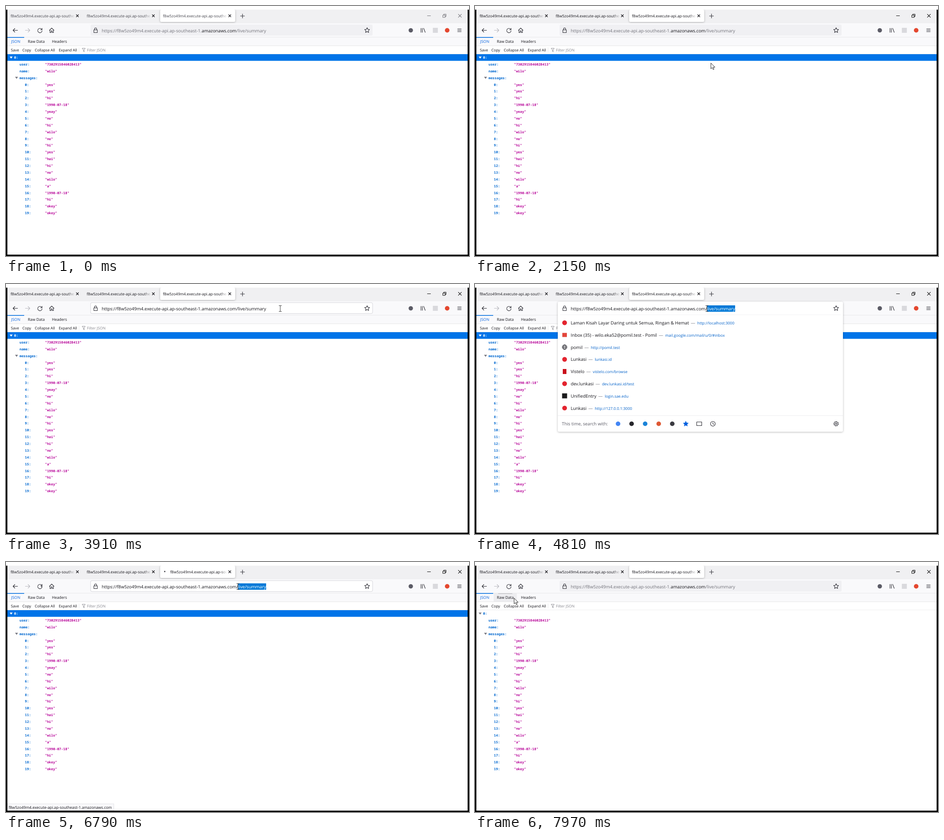
An HTML page for the animation above (8 s loop, 1018 px wide and 550 px high).

```html
<!DOCTYPE html>
<html lang="en">
<head>
<meta charset="utf-8">
<title>JSON viewer</title>
<style>
  html, body { margin: 0; width: 100%; height: 100%; overflow: hidden; background: #000; }
  svg { display: block; width: 100%; height: 100%; }
  text { font-family: "Open Sans", "Noto Sans", sans-serif; font-size: 8.43px; fill: #15141a;
         white-space: pre; text-rendering: geometricPrecision; }
  .big { font-size: 9.76px; }
  .tool { font-size: 8.25px; }
  .mono text { font-family: "Noto Sans Mono", "DejaVu Sans Mono", monospace; font-size: 7.43px; font-weight: 600; }
  .mono .key { fill: #0068d0; }
  .mono .val { fill: #b8089a; }
  .ico { fill: none; stroke: #2c2c34; stroke-width: 1.1; stroke-linecap: round; stroke-linejoin: round; }
  #panel, #active { filter: drop-shadow(0 1px 2px #0004); }
</style>
</head>
<body>
<svg id="stage" viewBox="0 0 1018 550" xmlns="http://www.w3.org/2000/svg"></svg>
<script>
const LOOP = 8000;
const host = 'f8w5zo49m4.execute-api.ap-southeast-1.';
const domain = 'amazonaws.com';
const path = '/live/summary';
const messages = ['yes', 'yes', 'hi', '1990-07-18', 'yeay', 'no', 'hi', 'wilo', 'no', 'hi', 'yes',
  'hai', 'hi', 'no', 'wilo', 'a', '1990-07-18', 'hi', 'okey', 'okey'];
const suggestions = [
  ['red', 'Laman Kisah Layar Daring untuk Semua, Ringan &amp; Hemat', 'http://localhost:3000'],
  ['mail', 'Inbox (35) - wilo.eka52@pomil.test - Pomil', 'mail.google.com/mail/u/0/#inbox'],
  ['globe', 'pomil', 'http://pomil.test'],
  ['red', 'Lunkasi', 'lunkasi.id'],
  ['film', 'Vistelo', 'vistelo.com/browse'],
  ['red', 'dev.lunkasi', 'dev.lunkasi.id/test'],
  ['dark', 'UnifiedEntry', 'login.sae.edu'],
  ['red', 'Lunkasi', 'http://127.0.0.1:3000']
];

const text = (x, y, s, attrs = '') => `<text x="${x}" y="${y}" ${attrs}>${s}</text>`;
const rect = (x, y, w, h, fill, attrs = '') =>
  `<rect x="${x}" y="${y}" width="${w}" height="${h}" fill="${fill}" ${attrs}/>`;
const dot = (x, y, r, fill) => `<circle cx="${x}" cy="${y}" r="${r}" fill="${fill}"/>`;
const icon = (x, y, d, attrs = '') => `<path class="ico" transform="translate(${x} ${y})" d="${d}" ${attrs}/>`;
const cross = r => `M${-r} ${-r}L${r} ${r}M${r} ${-r}L${-r} ${r}`;
const circle = r => `M${-r} 0A${r} ${r} 0 1 1 ${r} 0A${r} ${r} 0 1 1 ${-r} 0`;

function starPath(r) {
  const pts = Array.from({ length: 10 }, (_, i) => {
    const a = i * Math.PI / 5, q = i % 2 ? r * 0.48 : r;
    return `${(q * Math.sin(a)).toFixed(2)} ${(-q * Math.cos(a)).toFixed(2)}`;
  });
  return `M${pts.join('L')}Z`;
}

const tabTitle = (x, id) =>
  `<g transform="translate(${x} 25)" mask="url(#fade)">${text(0, 0, host + domain, `id="${id}"`)}</g>`;

function tabBar() {
  return rect(3, 8, 1012, 31, '#f0f0f2')
    + rect(339, 8, 165, 27, '#fff', 'id="active" rx="3"')
    + rect(339, 8, 134, 27, '#e4f2fd', 'id="burst" rx="3"')
    + tabTitle(10, 'title1') + tabTitle(177.5, 'title2') + tabTitle(345, 'title3')
    + '<circle id="throbber" cy="21" r="1.4" fill="#33333b"/>'
    + [157, 324, 492].map(x => icon(x, 21.5, cross(2.5), 'style="stroke:#15141a"')).join('')
    + icon(520, 22, 'M-4.5 0H4.5M0 -4.5V4.5')
    + `<g id="winButtons">${icon(930, 21.5, 'M-3.5 0H3.5', 'style="stroke:inherit"')
      + icon(964, 21.5, 'M-3.5 -1.5H1.5V3.5H-3.5ZM-1.5 -1.5V-3.5H3.5V1.5H1.5', 'style="stroke:inherit"')
      + icon(998, 21.5, cross(3.4), 'style="stroke:inherit"')}</g>`;
}

function navBar() {
  return rect(3, 38, 1012, 31, '#f9f9fb')
    + icon(20.5, 53.5, 'M5 0H-5M-1 -4L-5 0L-1 4')
    + icon(47.5, 53.5, 'M-5 0H5M1 -4L5 0L1 4', 'style="stroke:#b9b9bf"')
    + `<g id="reload">${icon(74.5, 54, 'M4.3 -2.2A4.8 4.8 0 1 0 4.8 .6M4.8 -5V-1.8H1.5')}</g>`
    + '<circle id="reloadDot" cx="78.5" cy="54" r="1.2" fill="#3d3d46"/>'
    + icon(100.5, 53.5, 'M-5 0L0 -5L5 0M-3.8 -1V5H-1.2V1.4H1.2V5H3.8V-1')
    + dot(890, 53.5, 4.8, '#5b5b66')
    + icon(917, 53.5, 'M-4.5 -4.5V4.5M-1.5 -4.5V4.5M1.2 -4.5L4.8 4.5')
    + rect(938.5, 48, 11, 11, '#d9d9dd')
    + dot(970, 53.5, 5, '#e4472f')
    + icon(997, 53.5, 'M-4 -3H4M-4 0H4M-4 3H4');
}

function viewer() {
  const row = (i, x, key, value) => {
    const y = 116 + 14.88 * i;
    return text(x, y, key + ':', `class="key" id="key${i}"`)
      + (value ? text(85.7, y, `"${value}"`, 'class="val"') : '');
  };
  const twisty = (x, y, id) => `<path id="${id}" d="M${x - 3.3} ${y - 2}h6.6l-3.3 4.4z" fill="#777780"/>`;
  return rect(3, 69, 1012, 478, '#fff')
    + rect(3, 69, 1012, 18, '#f9f9fb') + rect(3, 68.3, 1012, .7, '#e2e2e5')
    + `<g id="rawHover">${rect(41, 69, 51, 18, '#ededf0') + rect(51, 69, 31, 1, '#b8b8bd')}</g>`
    + rect(3, 68.4, 37, 1.6, '#0a74e2') + rect(3, 87, 1012, .8, '#e0e0e2')
    + text(11.5, 81, 'JSON', 'style="fill:#0060df"') + text(48, 81, 'Raw Data') + text(101, 81, 'Headers')
    + text(10.7, 100, 'Save', 'class="tool"') + text(36, 100, 'Copy', 'class="tool"')
    + text(63.3, 100, 'Collapse All', 'class="tool"') + text(116, 100, 'Expand All', 'class="tool"')
    + rect(160, 91, .7, 11, '#dedee2')
    + icon(171, 97, 'M-3.3 -4H3.3L.9 -.5V4L-.9 2.5V-.5Z', 'style="stroke:#77777f;stroke-width:.8"')
    + text(178, 100, 'Filter JSON', 'class="tool" style="fill:#85858c"')
    + rect(3, 105.4, 1012, .6, '#e2e2e5')
    + rect(3, 106, 1012, 14.6, '#0074e8', 'id="selectedRow"')
    + twisty(11.3, 113.3, 'rootTwisty') + twisty(23.2, 157.8, 'listTwisty')
    + `<g class="mono">${row(0, 17.8, '0') + row(1, 29.7, 'user', '7302915846028413')
      + row(2, 29.7, 'name', 'wilo') + row(3, 29.7, 'messages')
      + messages.map((m, i) => row(i + 4, 41.6, i, m)).join('')}</g>`;
}

function favicon(kind, y) {
  if (kind === 'red') return dot(197, y, 5.2, '#e3242f');
  if (kind === 'globe') return icon(197, y, circle(5) + 'M-5 0H5M0 -5C-3.4 -2 -3.4 2 0 5C3.4 2 3.4 -2 0 -5');
  if (kind === 'mail') return rect(192, y - 4.5, 10, 9, '#e2453a');
  if (kind === 'film') return rect(193, y - 5.5, 8, 11, '#c9101b');
  return rect(191.5, y - 5.5, 11, 11, '#1b1b1d');
}

function panel() {
  const rows = suggestions.map(([kind, title, url], i) => {
    const y = 85.3 + 26.8 * i;
    return favicon(kind, y) + text(210.5, y + 3.7,
      `${title}<tspan dx="4" style="fill:#77777f">—</tspan><tspan dx="4.5" style="font-size:8.43px;fill:#0060c8">${url}</tspan>`,
      'class="big"');
  }).join('');
  const engines = ['#4285f4', '#26262b', '#1a83d8', '#de5833', '#3a3a40']
    .map((c, i) => dot(314.5 + 29.8 * i, 307.5, 5, c)).join('');
  return rect(182, 39, 627, 286, '#fff', 'id="panel" rx="3"')
    + rect(187, 67.5, 617, .7, '#ececef') + rows
    + rect(182, 289, 627, .7, '#e6e6ea')
    + text(191, 311.4, 'This time, search with:', 'class="big" style="fill:#5b5b66"') + engines
    + icon(463.5, 307.8, starPath(6), 'style="fill:#0060df;stroke:#0060df;stroke-width:.6"')
    + icon(493, 307.5, 'M-5.5 -4H5.5V4H-5.5Z')
    + icon(523, 307.5, circle(5.2) + 'M0 -3V0L2.2 1.3')
    + icon(794, 307.5, circle(4.2) + circle(1.6))
    + icon(794, 307.5, circle(5), 'style="stroke-dasharray:2 1.93;stroke-linecap:butt"');
}

function addressBar() {
  const full = `https://${host}${domain}${path}`;
  return rect(186, 41, 620, 24, '#f0f0f3', 'id="field" rx="3"')
    + `<g id="dropdown">${panel()}</g>`
    + icon(197, 53.5, 'M-3.8 -1H3.8V5H-3.8ZM-2.3 -1V-3A2.3 2.3 0 0 1 2.3 -3V-1')
    + icon(794, 53.5, starPath(5.8))
    + text(210.5, 57.5, `https://${host}<tspan style="fill:#15141a">${domain}</tspan>${path}`, 'class="big" id="url"')
    + rect(0, 47, 0, 14, '#0078d7', 'id="selection"')
    + text(210.5, 57.5, full, 'class="big" style="fill:#fff" clip-path="url(#selClip)"');
}

const stage = document.getElementById('stage');
stage.innerHTML = `<defs>
    <linearGradient id="fadeOut"><stop offset=".9" stop-color="#fff"/><stop offset="1" stop-color="#fff" stop-opacity="0"/></linearGradient>
    <mask id="fade" maskUnits="userSpaceOnUse" x="-2" y="-12" width="143" height="18">
      ${rect(-2, -12, 143, 18, 'url(#fadeOut)')}</mask>
    <clipPath id="selClip">${rect(0, 47, 0, 14, '#000', 'id="selClipBox"')}</clipPath>
  </defs>`
  + rect(0, 0, 1018, 550, '#000') + tabBar() + navBar() + viewer() + addressBar()
  + `<g id="status">${rect(3, 532, 234, 15, '#f9f9fb', 'stroke="#d8d8dc" stroke-width=".7"')
    + text(5.7, 543, host + domain)}</g>`
  + '<path id="beam" d="M-3 -6.5H-.8L0 -6L.8 -6.5H3M0 -6V6M-3 6.5H-.8L0 6L.8 6.5H3" fill="none" stroke="#222" stroke-width=".9"/>'
  + '<path id="arrow" d="M0 0V12.6L2.9 9.9L4.9 14.4L6.9 13.5L5 9.2H8.9Z" fill="#fff" stroke="#111" stroke-width=".9"/>'
  + rect(0, 0, 3, 550, '#000') + rect(1015, 0, 3, 550, '#000')
  + rect(0, 547, 1018, 3, '#000') + rect(0, 0, 1018, 8, '#fff');

const el = {};
stage.querySelectorAll('[id]').forEach(n => { el[n.id] = n; });
const show = (n, on) => n.setAttribute('visibility', on ? 'visible' : 'hidden');

const moves = [
  [1700, 2420, 9, 620, 510, 503, 66],
  [2510, 2880, 5, 503, 66, 603, 54],
  [4000, 4630, 8, 603, 54, 512, 54],
  [4720, 4810, 2, 512, 54, 510, 54],
  [7430, 7970, 7, 510, 54, 86, 79.5]
];

function pointer(t) {
  const m = moves.filter(v => t >= v[0]).pop();
  if (!m) return null;
  const [start, end, steps, x0, y0, x1, y1] = m;
  const step = Math.min(steps, 1 + Math.floor((t - start) / (end - start) * (steps - 1) + 1e-6));
  const k = Math.sin(step / steps * Math.PI / 2);
  return { x: x0 + (x1 - x0) * k, y: y0 + (y1 - y0) * k };
}

function select(x) {
  const n = el.url.getNumberOfChars();
  const end = el.url.getEndPositionOfChar(n - 1).x;
  let left = end;
  for (let i = n - 1; i >= 0 && left > x; i--) left = el.url.getStartPositionOfChar(i).x;
  for (const box of [el.selection, el.selClipBox]) {
    box.setAttribute('x', left);
    box.setAttribute('width', end - left);
  }
}

function draw(t) {
  const awake = t >= 1420;
  const focused = t >= 3910 && t < 6880;
  const loading = t >= 6600 && t < 6880;
  const rowOn = t < 6880;
  const p = pointer(t);

  for (const id of ['title1', 'title2', 'title3']) el[id].style.fill = awake ? '#15141a' : '#45454d';
  el.winButtons.style.stroke = awake ? '#111' : '#77777d';
  el.title3.setAttribute('x', loading ? 16 : 0);
  show(el.throbber, loading);
  el.throbber.setAttribute('cx', 351 - 4 * Math.cos(Math.max(0, t - 6690) / 300 * Math.PI));
  show(el.burst, t >= 6880 && t < 7060);
  el.burst.setAttribute('width', t < 6970 ? 80 : 134);
  el.reload.style.opacity = t >= 6880 && t < 7520 ? .35 : 1;
  show(el.reloadDot, loading);

  show(el.selectedRow, rowOn);
  el.key0.style.fill = rowOn ? '#fff' : '#0068d0';
  el.rootTwisty.style.fill = rowOn ? '#fff' : '#777780';

  el.field.setAttribute('fill', focused ? '#fff' : '#f0f0f3');
  el.field.setAttribute('stroke', focused ? '#d4d4d9' : 'none');
  el.url.style.fill = focused ? '#15141a' : '#72727a';
  show(el.dropdown, t >= 4000 && t < 6600);
  select(focused && p ? p.x : 2000);
  show(el.status, loading);

  const overField = p && p.y < 65 && p.y > 41 && p.x > 207 && p.x < 780;
  show(el.beam, overField);
  show(el.arrow, p && !overField);
  if (p) for (const c of [el.beam, el.arrow]) c.setAttribute('transform', `translate(${p.x} ${p.y})`);
  show(el.rawHover, p && p.y > 69 && p.y < 87 && p.x > 41 && p.x < 92);
}

const begin = performance.now();
function tick() {
  draw((performance.now() - begin) % LOOP);
  requestAnimationFrame(tick);
}
tick();
</script>
</body>
</html>
```
